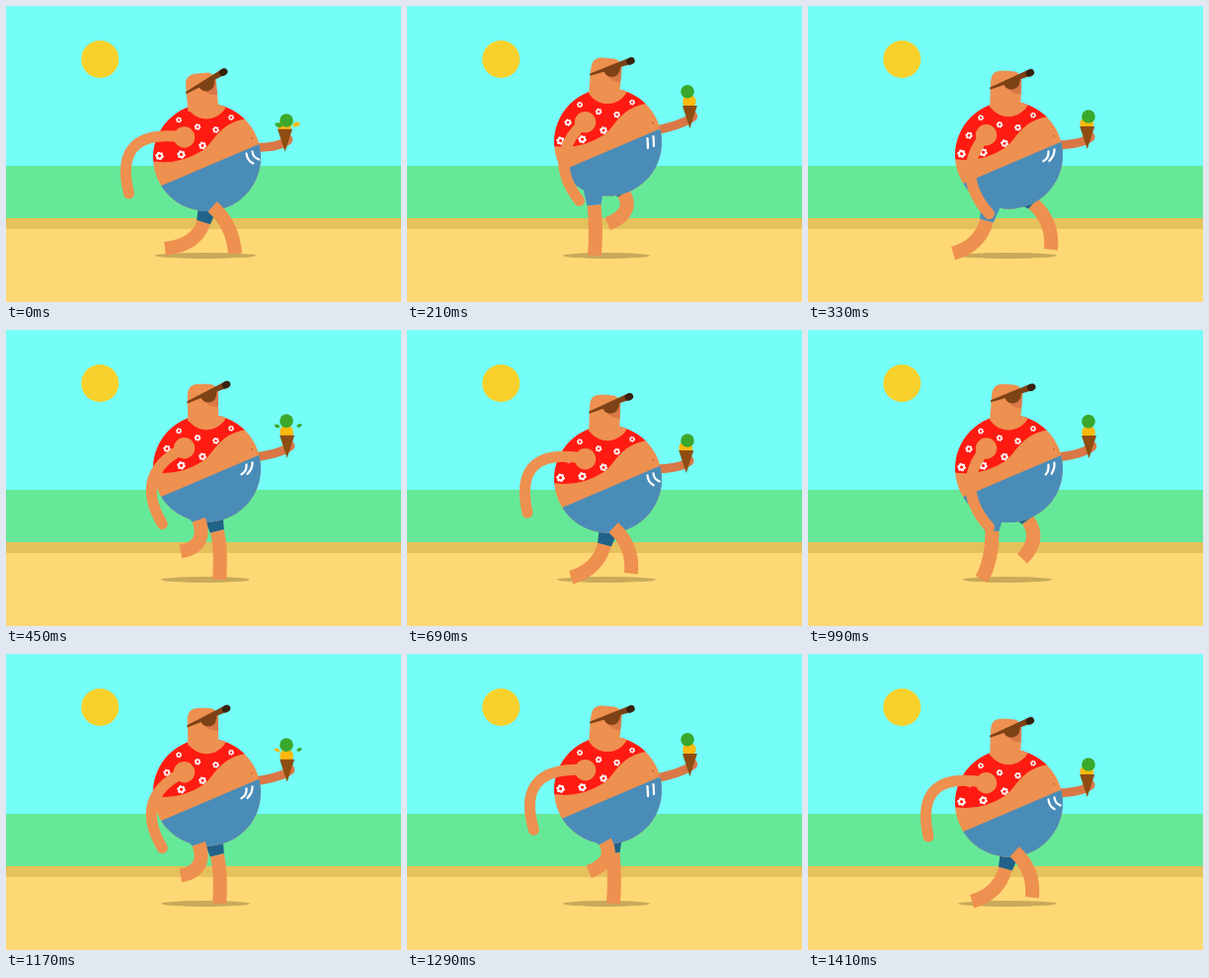
An HTML page with a canvas that plays this animation: 400x300 px, repeating every 1.44 s.

```html
<!DOCTYPE html>
<html lang="en">
<head>
<meta charset="utf-8">
<title>Beach walk</title>
<style>
html, body { margin: 0; width: 100%; height: 100%; overflow: hidden; }
canvas { display: block; width: 400px; height: 300px; }
</style>
</head>
<body>
<canvas id="stage"></canvas>
<script>
const LOOP = 1440, STRIDE = 720, STEP = 360;
const C = {
  sky: '#75fdf8', sea: '#66e899', shore: '#e5c15c', sand: '#fed875', sun: '#f9d12c',
  shade: '#c9a95a', skin: '#ee904f', tan: '#d97747', red: '#ff1b12', blue: '#4a8cb8',
  navy: '#206289', brown: '#7d4215', dark: '#38210f', cone: '#8f4d12',
  green: '#3aa82b', orange: '#fdb90e'
};
const FLOWERS = [
  [-48, -1.5], [-26, -3], [-4.5, -12], [9, -28],
  [-9.5, -31], [-28.5, -38], [24.5, -40.5], [-40.5, -20]
];

const canvas = document.getElementById('stage');
const ctx = canvas.getContext('2d');
const dpr = window.devicePixelRatio || 1;
canvas.width = 400 * dpr;
canvas.height = 300 * dpr;

const rad = deg => deg * Math.PI / 180;
const turn = (t, period) => t / period * 2 * Math.PI;

// Up and down twice per stride: flat at the top, quick at the bottom.
const bounce = (t, mid, a, b) =>
  mid + a * Math.cos(turn(t, STEP)) + b * Math.cos(2 * turn(t, STEP));

// 0 to 1 and back once per stride, lowest at `low`.
const swing = (t, low) => (1 - Math.cos(turn(t - low, STRIDE))) / 2;

function rect(x, y, w, h, color) {
  ctx.fillStyle = color;
  ctx.fillRect(x, y, w, h);
}

function oval(x, y, rx, ry, color, tilt = 0) {
  ctx.beginPath();
  ctx.ellipse(x, y, rx, ry, tilt, 0, 2 * Math.PI);
  ctx.fillStyle = color;
  ctx.fill();
}

const dot = (x, y, r, color) => oval(x, y, r, r, color);

function fill(d, color) {
  ctx.fillStyle = color;
  ctx.fill(new Path2D(d));
}

function line(d, width, color, cap = 'butt') {
  ctx.lineWidth = width;
  ctx.lineCap = cap;
  ctx.strokeStyle = color;
  ctx.stroke(new Path2D(d));
}

function leg(t, cy, dx, cloth) {
  const q = turn(t, STRIDE);
  const c1 = Math.cos(q), s1 = Math.sin(q), c3 = Math.cos(3 * q);
  const lift = Math.cos(q - rad(262));
  // Hem of the shorts, foot, and the bend between them.
  const x = 195 + 10 * c1 - 6 * s1 + 4 * c3;
  const y = cy + 57.7 - 4 * c1 + 8 * s1 - 4 * c3;
  const fx = 187 + 30 * c1 + 15 * c3;
  const fy = 253.5 - 17.5 * (lift + Math.sqrt(lift * lift + 0.06));
  const bx = (x + fx) / 2 + 11 - 9.5 * Math.sin(q + rad(10));
  const by = (y + fy) / 2 + 2 - 9 * Math.cos(q - rad(30));

  const len = Math.hypot(bx - x, by - y);
  const nx = (by - y) / len * 7.2, ny = (x - bx) / len * 7.2;
  const hy = cy + 40;
  ctx.save();
  ctx.translate(dx, 0);
  line(`M${x} ${y}Q${bx} ${by} ${fx} ${fy}`, 14, C.skin);
  fill(`M177 ${hy}L${x - nx} ${y - ny}L${x + nx} ${y + ny}L200 ${hy}Z`, cloth);
  ctx.restore();
}

function flower([x, y]) {
  const r = 4.5 + y * 0.035;
  for (let i = 0; i < 6; i++) {
    const a = rad(60 * i + 12);
    dot(x + Math.cos(a) * r * 0.62, y + Math.sin(a) * r * 0.62, r * 0.36, '#fff');
  }
  dot(x, y, r * 0.32, C.red);
}

function head(t) {
  const nod = -5.5 + 10.5 * Math.sin(2.4 * (t % STEP) / STEP) ** 1.5;
  ctx.save();
  ctx.translate(-3.5, -50);
  ctx.rotate(rad(nod));
  ctx.translate(4, 50);
  fill('M-19.8 -48V-74Q-19.8 -85.5 -8 -85.5H1Q11.2 -85.5 11.2 -75V-48Z', C.skin);
  fill('M-4 -70L11.2 -78V-62Q1 -62 -4 -70Z', C.tan);
  fill('M-6.5 -72L10 -79Q10 -68 3 -67Q-4 -66 -6.5 -72Z', C.brown);
  fill('M-20.3 -68.2L17 -87Q23 -89 23.3 -84.5Q23 -81 18 -80.5L-20.3 -66Z', C.brown);
  oval(19.6, -84.4, 4.4, 3.6, C.dark, -0.5);
  ctx.restore();
}

function body(t, cy) {
  ctx.save();
  ctx.translate(203.5, cy);
  ctx.save();
  ctx.beginPath();
  ctx.arc(0, 0, 54.5, 0, 2 * Math.PI);
  ctx.clip();
  rect(-60, -60, 120, 120, C.skin);
  fill('M-60 3Q-30 9.5 -4 -7.5C8 -15.5 12 -37.5 46 -40L40 -60H-60Z', C.red);
  FLOWERS.forEach(flower);
  dot(-0.5, -61, 22, C.skin);
  fill('M-60 34.5L60 -16.7V60H-60Z', C.blue);
  ctx.restore();
  const w = swing(t, 30);
  line(`M40 -4Q40.5 3 ${47 - 13 * w} 6M46 -6Q46.5 0 ${53 - 13 * w} ${2 + 4 * w}`,
    2.2, '#fff', 'round');
  dot(45.5, -19.5, 0.8, '#a3541f');
  head(t);
  ctx.restore();
}

function arm(t, cy) {
  const s = swing(t, -60);
  const reach = (r, deg) => `${-r * Math.sin(rad(deg))} ${r * Math.cos(rad(deg))} `;
  ctx.save();
  ctx.translate(180.5, cy - 20.5);
  line('M0 0C' + reach(47 - 30 * s, 102 - 60 * s) + reach(70 - 18 * s, 86 - 52 * s) +
    reach(80, 48 - 51 * s), 11, C.skin, 'round');
  dot(0, 0, 10.7, C.skin);
  ctx.restore();
}

function iceCream(t, cy) {
  const x = bounce(t, 284.6, -2.1, 0), y = bounce(t, 132.4, 11.9, 3);
  line(`M243 ${cy - 10.5}Q${x - 7} ${y - 2.5} ${x + 3} ${y - 11.5}`, 9, C.tan, 'round');
  dot(x + 2.5, y - 12, 5.2, C.tan);
  dot(x - 0.5, y - bounce(t, 26, -1, 0), 6.8, C.orange);
  fill(`M${x - 7.5} ${y - 22.5}h15L${x} ${y + 0.5}Z`, C.cone);
  dot(284, bounce(t, 97, 14.4, 4.6), 6.8, C.green);
  drops(t);
}

function drops(t) {
  const u = t % STEP / 180, step = Math.floor(t / STEP);
  if (u >= 1) return;
  const y = 121 - 68 * u + 42 * u * u, r = 3.6 * (1 - u * u);
  oval(276 - 3 * u, y, r, r * 0.6, step < 3 ? C.green : C.orange, 0.3);
  oval(294 + 6 * u, y - 0.5, r, r * 0.6, step % 2 ? C.green : C.orange, -0.3);
}

function draw(t) {
  const cy = bounce(t, 143.2, 7.5, 2.8);
  ctx.setTransform(dpr, 0, 0, dpr, 0, 0);
  rect(0, 0, 400, 300, C.sky);
  rect(0, 162, 400, 138, C.sea);
  rect(0, 215, 400, 85, C.shore);
  rect(0, 226, 400, 74, C.sand);
  dot(95.2, 54, 19, C.sun);
  oval(202, 253, 51 - (153.5 - cy) * 0.46, 3, C.shade);
  leg(t + STEP, cy, 19, C.navy);
  iceCream(t, cy);
  body(t, cy);
  leg(t, cy, 0, C.blue);
  arm(t, cy);
}

const start = performance.now();
function tick() {
  draw((performance.now() - start) % LOOP);
  requestAnimationFrame(tick);
}
tick();
</script>
</body>
</html>
```
